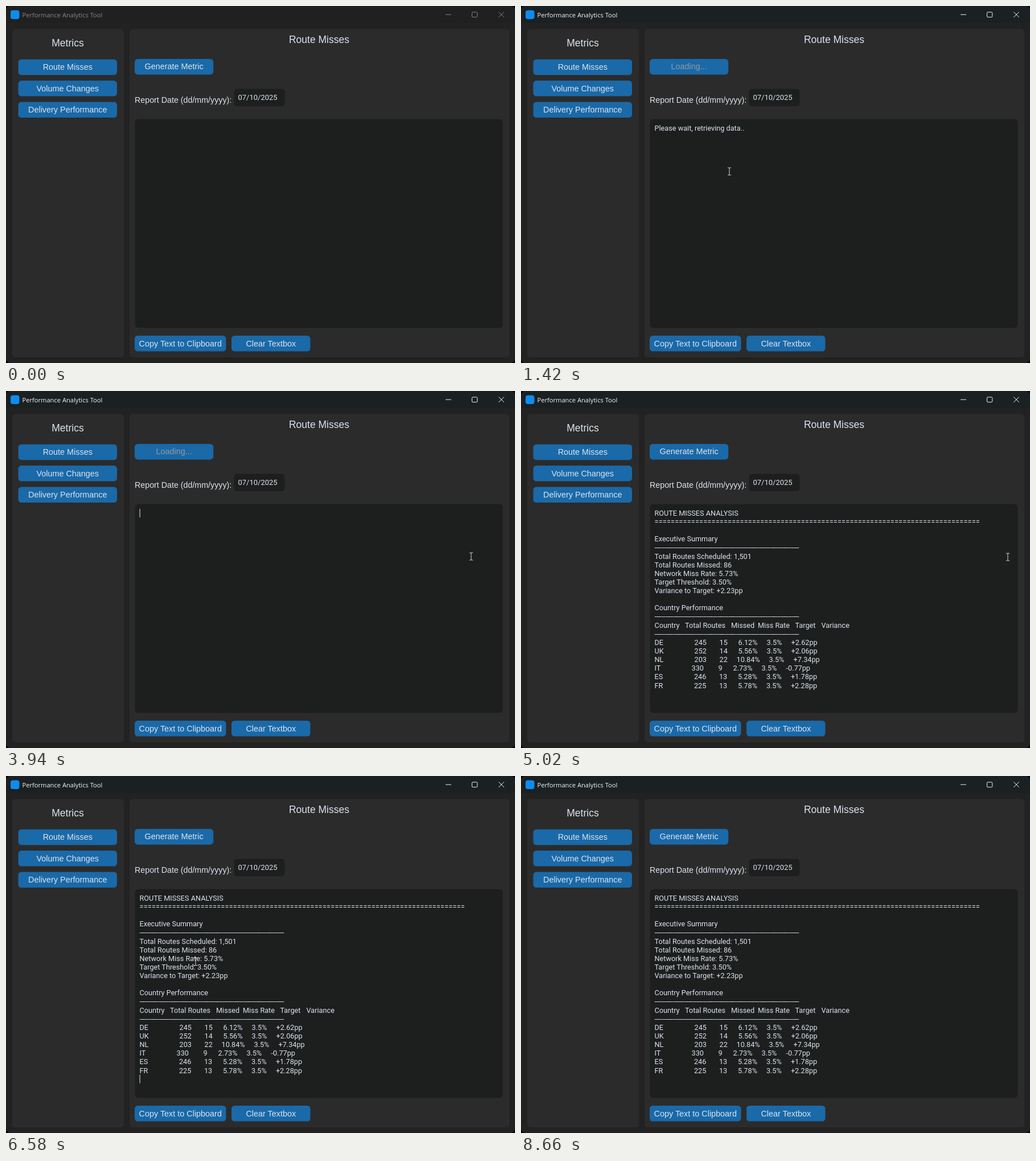
An HTML page that plays this animation: 894x627 px, repeating every 8.74 s.

```html
<!DOCTYPE html>
<html lang="en">
<head>
<meta charset="utf-8">
<title>Performance Analytics Tool</title>
<style>
  html, body { margin: 0; width: 100%; height: 100%; overflow: hidden; background: #000; }
  svg { display: block; }
  text { white-space: pre; fill: #dce4ee; font: 14.4px "Liberation Sans", Arial, sans-serif; }
  .head { font-size: 17.5px; }
  .field { font-size: 14.25px; }
  .caption { font: 11.15px "Open Sans", sans-serif; }
  .mono, .mono text { font: 12.7px Roboto, sans-serif; fill: #dce4ee; }
  .mid { text-anchor: middle; }
</style>
</head>
<body>
<svg id="stage" width="894" height="627" viewBox="0 0 894 627"></svg>
<script>
const LOOP = 8740;
const CLICK = 860, CLEARED = 3760, DONE = 4020;
const BLUE = "#1a69a8", HOVER = "#144870";
const stage = document.getElementById("stage");

function add(parent, tag, attrs, content) {
  const node = document.createElementNS("http://www.w3.org/2000/svg", tag);
  for (const key in attrs) node.setAttribute(key, attrs[key]);
  if (content !== undefined) node.textContent = content;
  parent.appendChild(node);
  return node;
}
const box = (x, y, width, height, rx, fill) =>
  add(stage, "rect", { x, y, width, height, rx, fill });
const label = (parent, x, y, content, cls = "") =>
  add(parent, "text", { x, y, class: cls }, content);

function button(x, y, width, content) {
  const rect = box(x, y, width, 27.5, 5.5, BLUE);
  const text = label(stage, x + width / 2, y + 18.5, content, "mid");
  return { rect, text };
}
const show = (node, on) => node.setAttribute("visibility", on ? "visible" : "hidden");

// Window
box(0, 0, 894, 627, 8, "#222222");
const bar = add(stage, "path", { d: "M0 30V8Q0 0 8 0H886Q894 0 894 8V30Z" });
box(8, 7.5, 15.5, 15.5, 4, "#0d8cf0");
const caption = label(stage, 28.5, 19.6, "Performance Analytics Tool", "caption");
const controls = add(stage, "path", {
  d: "M772 15.1H782M820 10.8H826.3Q827.8 10.8 827.8 12.3V18.1Q827.8 19.6 826.3 19.6H820" +
     "Q818.5 19.6 818.5 18.1V12.3Q818.5 10.8 820 10.8ZM865.3 10.4L874.8 19.9M874.8 10.4L865.3 19.9",
  fill: "none", "stroke-width": 1
});

// Sidebar
box(11, 40.5, 196, 576.5, 5.5, "#2b2b2b");
label(stage, 108.5, 70.7, "Metrics", "head mid");
["Route Misses", "Volume Changes", "Delivery Performance"]
  .forEach((name, i) => button(21.5, 93.7 + i * 37.4, 173.5, name));

// Main panel
box(217, 40.5, 667, 576.5, 5.5, "#2b2b2b");
label(stage, 550, 65, "Route Misses", "head mid");
const run = button(226, 92.9, 138.2, "Generate Metric");
label(stage, 226, 170, "Report Date (dd/mm/yyyy):", "field");
box(400.5, 145.6, 89, 30.5, 5.5, "#1d1e1e");
label(stage, 407.5, 165.4, "07/10/2025", "mono").style.fontSize = "13px";
box(226.5, 198.8, 646, 366.4, 5.5, "#1d1e1e");
button(226, 579, 160.5, "Copy Text to Clipboard");
button(396, 579, 138.5, "Clear Textbox");

// Text box contents
const LEFT = 234.5;
const lineY = row => 218.8 + row * 15.14;
const waiting = label(stage, LEFT, lineY(0), "Please wait, retrieving data..", "mono");
const report = add(stage, "g", { class: "mono" });
const lines = {
  0: "ROUTE MISSES ANALYSIS",
  3: "Executive Summary",
  5: "Total Routes Scheduled: 1,501",
  6: "Total Routes Missed: 86",
  7: "Network Miss Rate: 5.73%",
  8: "Target Threshold: 3.50%",
  9: "Variance to Target: +2.23pp",
  11: "Country Performance"
};
for (const row in lines) label(report, LEFT, lineY(+row), lines[row]);
label(report, LEFT, lineY(1), "=".repeat(80)).style.letterSpacing = "0.18px";
for (const row of [4, 12, 14])
  label(report, LEFT, lineY(row), "-".repeat(80)).style.letterSpacing = "-0.335px";

function tableRow(row, cells, xs) {
  cells.split("|").forEach((cell, i) => label(report, xs[i], lineY(row), cell));
}
tableRow(13, "Country|Total Routes|Missed|Miss Rate|Target|Variance",
  [LEFT, 288, 369, 416, 481.5, 527.5]);
const cols = [304.5, 348.5, 381.5, 431.5, 474.5];
const shifts = { NL: [0, 0, -3, 4, 4], IT: [-5, -2, -9, -9, -9] };
[
  "DE|245|15|6.12%|3.5%|+2.62pp",
  "UK|252|14|5.56%|3.5%|+2.06pp",
  "NL|203|22|10.84%|3.5%|+7.34pp",
  "IT|330|9|2.73%|3.5%|-0.77pp",
  "ES|246|13|5.28%|3.5%|+1.78pp",
  "FR|225|13|5.78%|3.5%|+2.28pp"
].forEach((cells, i) => {
  const shift = shifts[cells.slice(0, 2)] || [0, 0, 0, 0, 0].fill(i > 3 ? -0.6 : 0);
  tableRow(15 + i, cells, [LEFT, ...cols.map((x, k) => x + shift[k])]);
});
const caret = box(234.6, 0, 1, 15, 0, "#dce4ee");

// Pointer
const pointer = add(stage, "g", {});
const beam = add(pointer, "path", {
  d: "M-3 -6.5H-1L0 -5.8L1 -6.5H3M0 -5.8V5.8M-3 6.5H-1L0 5.8L1 6.5H3",
  fill: "none", stroke: "#d8d8d8", "stroke-width": 1
});
const arrow = add(pointer, "path", {
  d: "M0 0V14.5L3.4 11.4L5.6 16.4L7.8 15.4L5.6 10.6H10.3Z",
  fill: "#fff", stroke: "#000", "stroke-width": 0.8
});
const hand = add(pointer, "path", {
  d: "M-1.5 1Q0 -1 1.5 1V6L8 7.5Q9 8 9 9.5L7.8 16H0L-4.5 10.5Q-4.5 8.5 -1.5 10Z",
  fill: "#fff", stroke: "#000", "stroke-width": 0.8
});
// [time, x, y]
const path = [
  [60, 905, 300], [560, 312, 114], [900, 306, 110], [1380, 366, 290.5],
  [1860, 366, 290.5], [2580, 668, 291], [2720, 668, 291], [3320, 758, 291],
  [3460, 760, 291], [3620, 789, 291], [3760, 790, 291], [3940, 817, 290.5],
  [4020, 817, 290.5], [4600, 853, 291], [5020, 855, 291.5], [5520, 855, 291.5],
  [6400, 425, 322], [6580, 333, 326], [6900, 333, 326], [7300, 428, 331],
  [7820, 632.5, 337], [8200, 740, 339], [8620, 905, 341]
];

function pointerAt(t) {
  const i = path.findIndex(key => key[0] > t);
  if (i < 1) return [905, 341];
  const [t0, x0, y0] = path[i - 1], [t1, x1, y1] = path[i];
  const k = (t - t0) / (t1 - t0);
  return [x0 + (x1 - x0) * k, y0 + (y1 - y0) * k];
}
const within = (x, y, x0, y0, x1, y1) => x > x0 && x < x1 && y > y0 && y < y1;

function draw(t) {
  const active = t >= 800;
  const loading = t >= CLICK && t < DONE;
  bar.setAttribute("fill", active ? "#1b2022" : "#202020");
  controls.setAttribute("stroke", active ? "#f2f2f2" : "#858585");
  caption.style.fill = active ? "#f5f5f5" : "#858585";

  const [x, y] = pointerAt(t);
  const overRun = within(x, y, 226, 93, 364, 120);
  const overText = within(x, y, 226, 199, 873, 565) || within(x, y, 400, 146, 490, 176);
  run.rect.setAttribute("fill", overRun && !loading ? HOVER : BLUE);
  run.text.textContent = loading ? "Loading..." : "Generate Metric";
  run.text.style.fill = loading ? "#939aa0" : "#dce4ee";

  show(waiting, t >= CLICK && t < CLEARED);
  show(report, t >= DONE);
  const blink = t % 890;
  show(caret, t >= CLEARED && (blink < 390 || blink >= 690));
  caret.setAttribute("y", t < DONE ? 207 : 524.5);

  pointer.setAttribute("transform", `translate(${x.toFixed(1)} ${y.toFixed(1)})`);
  show(beam, overText);
  show(hand, overRun);
  show(arrow, !overText && !overRun);
}

function tick() {
  draw(performance.now() % LOOP);
  requestAnimationFrame(tick);
}
tick();
</script>
</body>
</html>
```
